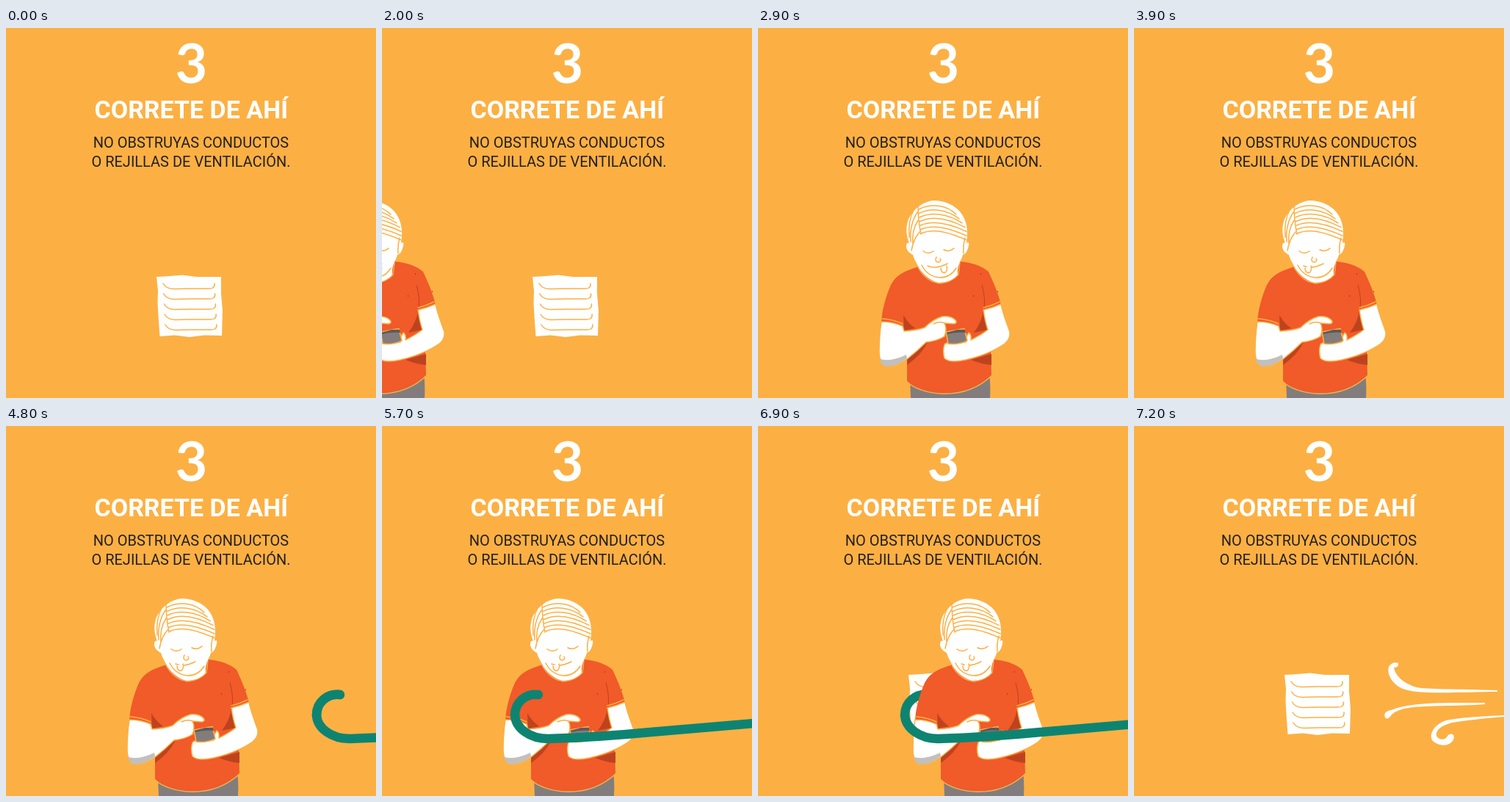
Animation, 504 px wide and 504 px high, one loop 7.4 s. Source, as an HTML page:

```html
<!DOCTYPE html>
<html lang="es">
<head>
<meta charset="utf-8">
<title>Correte de ahí</title>
<style>
  html, body { margin: 0; width: 100%; height: 100%; overflow: hidden; background: #fcb043; }
  svg { display: block; width: 100vw; height: 100vh; }
  text { text-anchor: middle; font-family: Roboto, sans-serif; }
  .title { font-weight: 700; fill: #fff; }
  .body { font-size: 20px; fill: #231f20; }
  .white { fill: #fff; }
  .line { fill: none; stroke: #fcb043; stroke-width: 1.5; stroke-linecap: round; stroke-linejoin: round; }
  .limb { fill: #fff; stroke: #fcb043; stroke-width: 1.5; stroke-linejoin: round; }
  .shade { fill: #bd431f; }
  .cane { fill: none; stroke: #0d8471; stroke-width: 12.5; stroke-linecap: round; stroke-linejoin: round; }
</style>
</head>
<body>
<svg viewBox="0 0 504 504">
  <rect width="504" height="504" fill="#fcb043"/>
  <text class="title" x="252.5" y="75" style="font: 700 75.5px Lato, sans-serif">3</text>
  <text class="title" x="252.3" y="122.7" font-size="34">CORRETE DE AHÍ</text>
  <text class="body" x="252" y="162.700">NO OBSTRUYAS CONDUCTOS</text>
  <text class="body" x="252" y="188.500">O REJILLAS DE VENTILACIÓN.</text>

  <path class="white" d="M205 339L222 338L240 336.5L260 339L293 339L293 362L295 385L294 419L270 418.500L250 421L230 418.500L209.500 420L208 400L206.500 375L207 358Z"/>
  <g id="slats" class="line"></g>

  <g id="wind" class="white">
    <path d="M360 323Q352 320 347 328C344 338 352 351 364 357C385 367 440 362 495 362V360C440 358 400 359 385 356C368 351 356 341 354 329Q361 329 360 323Z"/>
    <path d="M342 397Q339 389 350 387C380 375 430 377 478 377V379C440 382 390 380 368 385Q352 389 348 397Q344 400 342 397"/>
    <path d="M504 394C460 396 440 398 425 401C405 408 401 424 408 430C418 438 434 436 436 424Q435 417 428 421C424 429 415 428 412 422C411 412 422 407 434 404C460 400 480 398 504 396Z"/>
  </g>

  <path id="hookBack" class="cane" d="M39 366C22 364 7 376 7 394"/>

  <g id="person">
    <path fill="#827d7c" d="M207 478L208 504H316Q317 488 315 470Z"/>
    <path fill="#f15a29" d="M219 325C200 331 188 336 181 350C174 366 169 384 168 401Q183 402 197 408L203 420L203 481C222 499 279 509 318 473L317 440L308 386Q320 383 331 377C327 360 320 345 314 332Q300 320 275 318L245 340Z"/>
    <path class="line" d="M203 482C222 500 279 510 318 474"/>
    <path class="shade" d="M198 391Q204 402 214 409L199 412ZM203 447L231 428Q222 446 203 459ZM318 444V459Q305 458 290 452ZM307 386Q304 402 294 415L313 411Z"/>
    <path d="M305 350Q311 370 307 388" fill="none" stroke="#bd431f"/>
    <path d="M326 359h1M293 365h1M303 335h1" stroke="#8e3218" stroke-width="1.500"/>
    <path class="line" d="M169 396Q184 397 197 403M307 381Q319 378 329 373"/>

    <path class="limb" d="M307 384Q320 381 331 376C333 388 339 402 343 414Q344 424 336 430C322 440 300 448 283 452Q262 457 254 450Q251 440 254 431Q257 427 262 430L283 428Q283 420 287 415Q291 417 290 425Q304 418 313 411Q309 399 307 384Z"/>
    <path class="limb" style="fill:#827d7c" d="M256 414L281 409.500L285 426Q273 432 259 430Z"/>
    <path d="M257 415L271 411L282 411L283 415Q270 414 258 417Z" fill="#5f5a59"/>
    <path class="limb" d="M168 400Q183 400 197 406L199 413Q217 412 227 408Q238 397 251 393Q263 392 269 398Q272 402 267 403L254 402Q258 410 254 420Q245 426 229 428Q217 440 203 451Q188 462 175 461Q165 456 165 442Q165 420 168 400Z"/>
    <path class="line" d="M239 403Q247 399 254 402"/>
    <path d="M166 451Q182 455 202 445L203 450Q188 462 174 461Q167 458 166 451Z" fill="#c2bfbd"/>

    <path class="line" d="M218 326Q229 346 248 348Q264 346 273 336L275 319"/>
    <path class="white" d="M203 268C205 253 221 236 240 235C262 236 278 247 283 265C286 275 285 285 284 293C288 290 288 295 286 300C284 307 281 308 279 309C277 317 271 322 272 336C266 343 257 347 246 347C236 345 226 337 220 328C216 320 213 316 211 309C206 307 201 301 202 296Q203 291 206 293C203 285 201 276 203 268Z"/>
    <g id="hair" class="line">
      <path d="M218 241Q218 262 222 281M213 246Q204 262 206 285M217 251Q206 268 208 291M218 262Q209 276 211 295M221 277Q212 286 209 303M282 286Q279 297 280 307"/>
    </g>
    <path class="line" d="M225 304Q232 309 239 304M253 302Q260 306 267 300M243 312Q240 319 246 319Q250 318 248 314M231 324Q242 329 258 321M223 323Q231 339 248 340Q262 340 270 327"/>
    <path id="tongue" class="limb" d="M0 0Q0 7 5 7Q10 5 8-3"/>
  </g>

  <path id="hookFront" class="cane" d="M39 366C22 364 7 376 7 394"/>
  <path id="shaft" class="cane" d="M7 394C8 412 28 426 52 426Q120 424 192 417L356 403L520 390"/>
</svg>
<script>
const LOOP = 7400;
const $ = id => document.getElementById(id);
const addPath = (id, d) => {
  const p = document.createElementNS("http://www.w3.org/2000/svg", "path");
  p.setAttribute("d", d);
  $(id).append(p);
};

for (let i = 0; i < 5; i++) {
  const x = 214 + i * 0.7, y = 348 + i * 14;
  addPath("slats", `M${x} ${y}q4 7 14 7.5l22 -.5l24 0q11 1 10 -7`);
}
for (let i = 0; i < 7; i++) {
  const y = 247 + i * 5.5;
  addPath("hair", `M${219 + i * 0.5} ${y}C${234 + i} ${y - 8} ${256 + i} ${y - 7 + i} ${Math.min(284, 270 + i * 4)} ${254 + i * 5.8}`);
}

// [start time, value]; a value holds until the next start
const personX = [[0, null], [2000, -258], [2100, -167], [2200, -76], [2300, 0], [6600, 26], [6900, 46], [7200, null]];
const caneX = [[0, null], [4800, 416], [5100, 335], [5400, 252], [5700, 174], [6000, 105], [6300, 147], [6600, 173], [6900, 193], [7200, null]];
const tongueLeft = [[0, false], [2600, true], [2900, false], [3900, true], [5100, false], [5400, true]];
const at = (steps, t) => steps.findLast(s => s[0] <= t)[1];

function show(id, visible) {
  $(id).style.display = visible ? "" : "none";
}
function place(id, x, y = 0) {
  show(id, x !== null);
  if (x !== null) $(id).setAttribute("transform", `translate(${x} ${y})`);
}

function draw(now) {
  const t = now % LOOP, x = at(caneX, t);
  place("person", at(personX, t));
  place("tongue", at(tongueLeft, t) ? 233 : 249, 326.5);
  for (const id of ["hookBack", "hookFront", "shaft"]) place(id, x);
  if (t >= 6300) show("hookFront", false);
  show("wind", t >= 7200);
}

let start;
function tick(now) {
  start ??= now;
  draw(now - start);
  requestAnimationFrame(tick);
}
draw(0);
requestAnimationFrame(tick);
</script>
</body>
</html>
```
